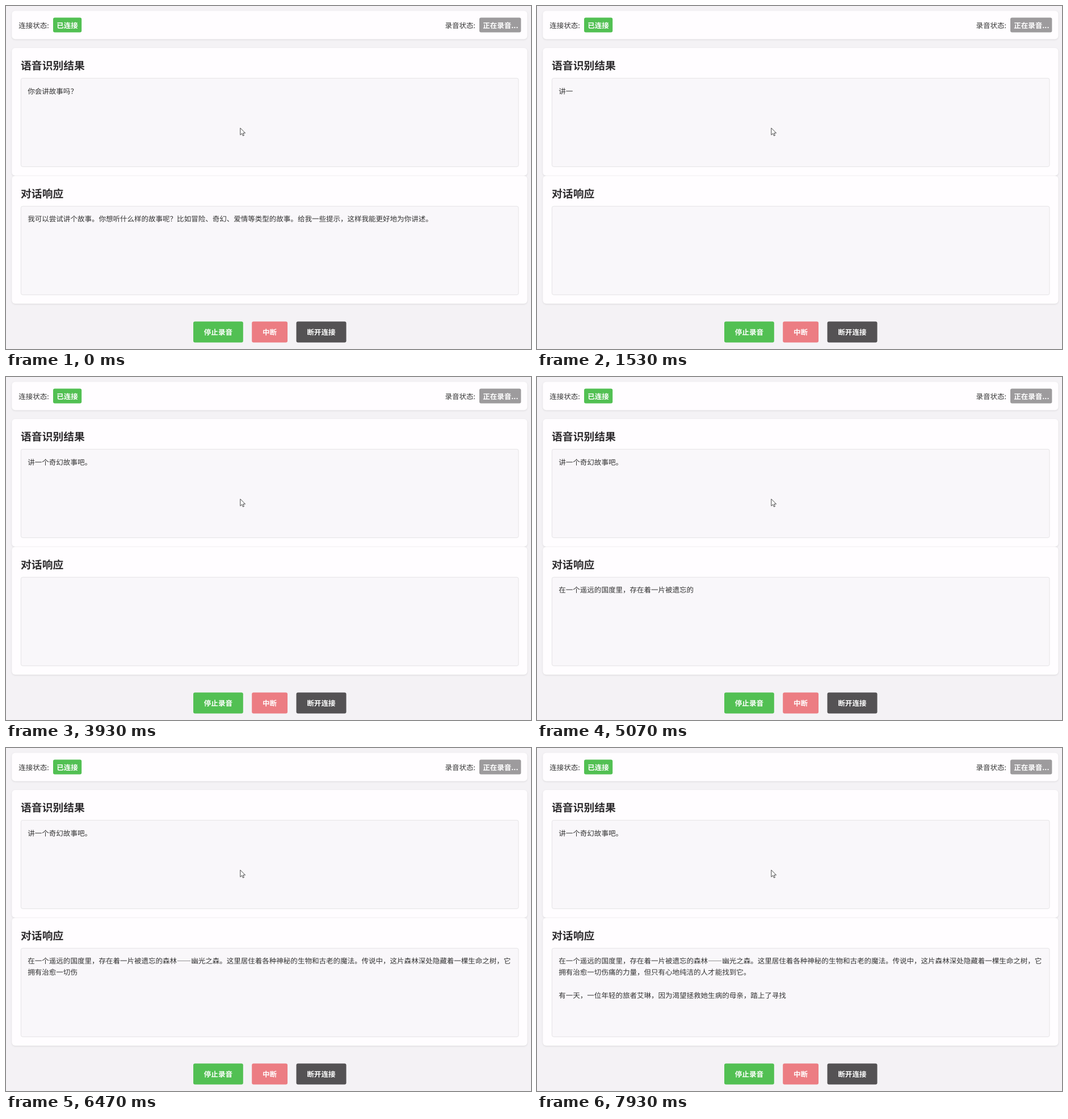
Recreate the animation shown at these times as an HTML page. Size 925 px wide and 605 px high, loop 8000 ms.

```html
<!DOCTYPE html>
<html lang="zh-CN">
<head>
<meta charset="utf-8">
<title>语音对话</title>
<style>
  html, body { margin: 0; width: 100%; height: 100%; overflow: hidden; background: #f4f2f5; }
  svg { display: block; }
  text {
    font: 12.53px "Noto Sans CJK SC", "Noto Sans CJK", "Noto Sans", sans-serif;
    text-rendering: geometricPrecision;
    fill: #333;
  }
  .bold { font-weight: 700; fill: #fff; }
  .title { font-size: 18.8px; font-weight: 700; fill: #2d2b2d; }
  .card { fill: #fffdff; filter: drop-shadow(0 1.6px 1.6px rgba(0, 0, 0, .1)); }
  .box { fill: #f9f7fa; stroke: #e3e1e4; stroke-width: .9; }
  .green { fill: #52c053; }
  .grey { fill: #9d9b9d; }
  .pink { fill: #ec7d83; }
  .dark { fill: #545254; }
</style>
</head>
<body>
<svg width="925" height="605" viewBox="0 0 925 605">
  <rect class="card" x="10.3" y="8.6" width="908.2" height="49.8" rx="6"/>
  <rect class="card" x="10.3" y="74" width="908.2" height="225.3" rx="6"/>
  <rect class="card" x="10.3" y="299.6" width="908.2" height="225.5" rx="6"/>

  <text x="22.2" y="38.6">连接状态:</text>
  <rect class="green" x="83" y="20.4" width="50.2" height="26" rx="3"/>
  <text class="bold" x="89.3" y="38.6">已连接</text>
  <text x="773.4" y="38.6">录音状态:</text>
  <rect class="grey" x="834" y="20.4" width="73.4" height="26" rx="3"/>
  <text class="bold" x="840.2" y="38.6">正在录音...</text>

  <text class="title" x="26.1" y="112.1">语音识别结果</text>
  <rect class="box" x="26.4" y="127.4" width="876.6" height="156" rx="3"/>
  <text class="title" x="26.1" y="337.6">对话响应</text>
  <rect class="box" x="26.4" y="353.2" width="876.6" height="156.2" rx="3"/>

  <text id="speech" x="38.3" y="154.8"></text>
  <g id="reply">
    <text x="38.3" y="380.3"></text>
    <text x="38.3" y="400.4"></text>
    <text x="38.3" y="420.4"></text>
    <text x="38.3" y="440.5"></text>
  </g>

  <rect class="green" x="330" y="556.6" width="87.8" height="37" rx="3"/>
  <text class="bold" x="373.9" y="580.2" text-anchor="middle">停止录音</text>
  <rect class="pink" x="433.2" y="556.6" width="62.8" height="37" rx="3"/>
  <text class="bold" x="464.6" y="580.2" text-anchor="middle">中断</text>
  <rect class="dark" x="511.5" y="556.6" width="88" height="37" rx="3"/>
  <text class="bold" x="555.4" y="580.2" text-anchor="middle">断开连接</text>

  <path d="M412.8 215.2V227.4L415.6 224.8L417.5 229L419.4 228.2L417.6 224.1H421.5Z"
        fill="#fff" stroke="#333" stroke-width=".9" stroke-linejoin="round"/>
</svg>
<script>
  const LOOP = 8000, CLEAR_AT = 1200;
  const question = '你会讲故事吗？';
  const request = '讲一个奇幻故事吧。';
  const offer = '我可以尝试讲个故事。你想听什么样的故事呢？比如冒险、奇幻、爱情等类型的故事。给我一些提示，这样我能更好地为你讲述。';
  const story = '在一个遥远的国度里，存在着一片被遗忘的森林——幽光之森。这里居住着各种神秘的生物和古老的魔法。传说中，这片森林深处隐藏着一棵生命之树，它\n'
    + '拥有治愈一切伤痛的力量，但只有心地纯洁的人才能找到它。\n\n'
    + '有一天，一位年轻的旅者艾琳，因为渴望拯救她生病的母亲，踏上了寻找';

  // [time in ms, characters shown]
  const heard = [[CLEAR_AT, 2], [2070, 4], [2930, 7], [3530, 9]];
  const told = [
    [4400, 3], [4730, 13], [5070, 19], [5200, 25], [5400, 30], [5600, 38], [5670, 44],
    [5870, 50], [6070, 55], [6130, 60], [6200, 64], [6400, 69], [6470, 76], [6600, 82],
    [6870, 88], [7270, 94], [7330, 96], [7470, 107], [7530, 116], [7670, 124], [7930, 132]
  ];

  const speech = document.getElementById('speech');
  const lines = [...document.getElementById('reply').children];
  const typed = (text, steps, t) =>
    text.slice(0, steps.reduce((n, [at, count]) => t >= at ? count : n, 0));

  function show(node, text) {
    if (node.textContent !== text) node.textContent = text;
  }

  function draw() {
    const t = performance.now() % LOOP;
    const fresh = t >= CLEAR_AT;
    const reply = (fresh ? typed(story, told, t) : offer).split('\n');
    show(speech, fresh ? typed(request, heard, t) : question);
    lines.forEach((line, i) => show(line, reply[i] || ''));
    requestAnimationFrame(draw);
  }
  draw();
</script>
</body>
</html>
```
